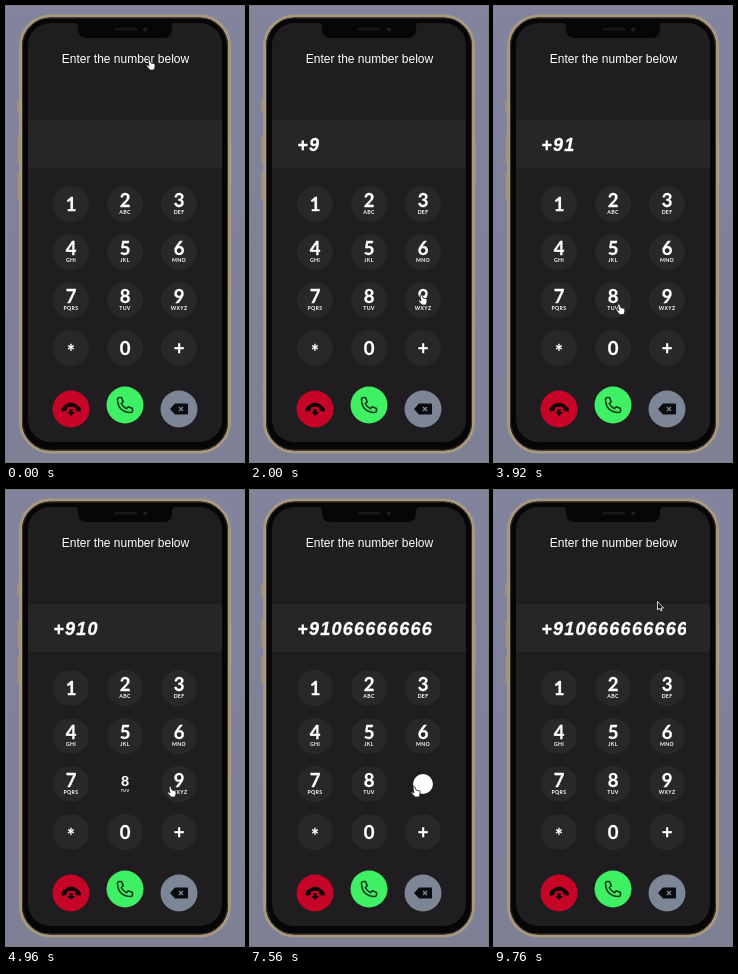
Animation, 238 px wide and 456 px high, one loop 10000 ms. Source, as an HTML page:

```html
<!DOCTYPE html>
<html lang="en">
<head>
<meta charset="utf-8">
<title>Dial pad</title>
<style>
  html, body { margin: 0; width: 100%; height: 100%; overflow: hidden; background: #80819a; }
  svg { display: block; width: 238px; height: 456px; }
  text { fill: #fff; text-anchor: middle; }
  .title { font: 12px "Liberation Sans", Arial, sans-serif; }
  .display { font: italic bold 18px "Liberation Sans", Arial, sans-serif; letter-spacing: 1.25px; text-anchor: start; stroke: #fff; stroke-width: .3; }
  .digit { font: bold 18.5px Lato, sans-serif; stroke: #fff; stroke-width: .3; }
  .letters { font: bold 5.2px Lato, sans-serif; letter-spacing: .3px; }
</style>
</head>
<body>
<svg viewBox="0 0 238 456">
  <defs>
    <clipPath id="band"><rect x="44" y="114" width="148" height="48"/></clipPath>
    <linearGradient id="wall" x2="0" y2="1"><stop stop-color="#82839d"/><stop offset="1" stop-color="#7e8096"/></linearGradient>
  </defs>
  <rect width="238" height="456" fill="url(#wall)"/>

  <g fill="#9c8d78">
    <rect x="11" y="93" width="4" height="14" rx="1"/>
    <rect x="11" y="129" width="4" height="28" rx="1"/>
    <rect x="11" y="166" width="4" height="28" rx="1"/>
    <rect x="223" y="134" width="3" height="45" rx="1"/>
  </g>
  <rect x="14.500" y="10" width="209" height="436" rx="30" fill="#060607" stroke="#a8987f" stroke-width="3"/>
  <rect x="16.500" y="12" width="205" height="432" rx="28" fill="none" stroke="#3a332c"/>
  <rect x="22" y="17" width="194" height="419" rx="22" fill="#1f1d1f"/>
  <rect x="22" y="114" width="194" height="48" fill="#272527"/>
  <path d="M68 16h102q-4 1-4 5v2q0 9-9 9H81q-9 0-9-9v-2q0-4-4-5z" fill="#060607"/>
  <rect x="108" y="22" width="23" height="2.4" rx="1.2" fill="#17171a"/>
  <circle cx="139" cy="23.500" r="2" fill="#1b2030"/>

  <text class="title" x="119.5" y="57.3">Enter the number below</text>
  <g clip-path="url(#band)"><text class="display" id="display" x="47.3" y="145"></text></g>
  <g id="keys"></g>

  <g transform="translate(65 403)">
    <circle r="18.5" fill="#c60428"/>
    <path d="M-10 0Q0-13 10 0Q10 3 8 2.5L5 2Q4 1 4-1.500Q0-3-4-1.500Q-4 1-5 2L-8 2.5Q-10 3-10 0zM-1.500 0h3v3H4L0 7-4 3h2.500z" fill="#140407"/>
  </g>
  <g transform="translate(119 399)">
    <circle r="18.5" fill="#3ff065"/>
    <path d="M-7.5-5.5Q-7.5-7.5-5.5-7.5H-3.5L-1.800-3.2-3.8-1.500Q-2 2 1.5 3.8L3.2 1.8 7.5 3.5V5.5Q7.5 7.5 5.5 7.5Q-7 7-7.5-5.5z"
      fill="none" stroke="#123d1d" stroke-width="1.6" stroke-linejoin="round"/>
  </g>
  <g transform="translate(173 403)">
    <circle r="18.5" fill="#7c8696"/>
    <path d="M-9 0L-4-5.500H8Q9-5.500 9-4.500V4.500Q9 5.500 8 5.500H-4z" fill="#0b0c0e"/>
    <path d="M0-2l4 4m0-4l-4 4" stroke="#7c8696" stroke-width="1.4"/>
  </g>

  <path id="hand" fill="#fff" stroke="#222" stroke-width=".8" stroke-linejoin="round"
    d="M2 1Q3 0 4 1L5 4 9 5V8L8 11H4L.6 7Q.2 6 1.5 6L3 7z"/>
  <path id="arrow" fill="#111" stroke="#fff" stroke-width=".8" stroke-linejoin="round"
    d="M.5.5V9L2.500 7 4 10 5 9.500 4 7H6.500z"/>
</svg>
<script>
const LOOP = 10000;
const NUMBER = "+910666666666";
const TAP_DELAY = 160, TAP_GAP = 330;
// Pointer moves: where to, when, and how often it taps on arrival
const MOVES = [
  { x: 140, y: 53, leave: -1, arrive: 0, taps: 0 },
  { x: 168, y: 339, leave: 280, arrive: 1280, taps: 1 },
  { x: 168, y: 288, leave: 1460, arrive: 1740, taps: 1 },
  { x: 59, y: 195, leave: 2120, arrive: 2680, taps: 1 },
  { x: 122, y: 298, leave: 2860, arrive: 4440, taps: 1 },
  { x: 161, y: 296, leave: 4620, arrive: 4915, taps: 9 },
  { x: 112, y: 406, leave: 7780, arrive: 8480, taps: 0 },
  { x: 163, y: 111, leave: 9320, arrive: 9740, taps: 0 }
];
const $ = id => document.getElementById(id);
const ramp = (t, from, to) => Math.min(1, Math.max(0, (t - from) / (to - from)));
const grow = (t, from, to) => Math.sqrt(ramp(t, from, to));
const easeOut = p => 1 - (1 - p) ** 5;

const keyAt = (x, y) => Math.round((x - 60) / 54) + 3 * Math.round((y - 194) / 48);
const taps = MOVES.flatMap(m => Array.from({ length: m.taps }, (_, i) =>
  ({ time: m.arrive + TAP_DELAY + i * TAP_GAP, key: keyAt(m.x, m.y) })));

const keys = ["1", "2 ABC", "3 DEF", "4 GHI", "5 JKL", "6 MNO", "7 PQRS", "8 TUV", "9 WXYZ", "*", "0", "+"].map((name, i) => {
  const [digit, letters = ""] = name.split(" ");
  const baseline = digit === "*" ? 10 : letters ? 2.5 : 6.5;
  const x = 65 + i % 3 * 54, y = 198 + Math.floor(i / 3) * 48;
  $("keys").insertAdjacentHTML("beforeend", `<g transform="translate(${x} ${y})">
    <circle r="18" fill="#292729"/>
    <g><text class="digit" y="${baseline}">${digit}</text>
    <text class="letters" y="10.3">${letters}</text></g>
    <circle fill="none" stroke="#fff"/></g>`);
  const [disc, label, ring] = $("keys").lastElementChild.children;
  return { disc, label, ring };
});

// A white dot bursts into a ring, then the label grows back
function drawKey({ disc, label, ring }, age) {
  const outer = 16 * grow(age, 110, 280), hole = 16 * grow(age, 180, 280);
  const idle = age < 110;
  ring.setAttribute("r", (outer + hole) / 2);
  ring.setAttribute("stroke-width", outer - hole);
  label.setAttribute("transform", `scale(${idle ? 1 : grow(age, 175, 500)})`);
  disc.setAttribute("opacity", idle ? 1 : ramp(age, 360, 500));
}

function drawPointer(t) {
  const i = MOVES.findLastIndex(m => m.leave <= t);
  const to = MOVES[i], from = MOVES[i - 1] || to;
  const p = easeOut(ramp(t, to.leave, to.arrive));
  const x = from.x + (to.x - from.x) * p, y = from.y + (to.y - from.y) * p;
  const shape = i === MOVES.length - 1 && p > .2 ? "arrow" : "hand";
  for (const id of ["hand", "arrow"]) {
    $(id).setAttribute("transform", `translate(${x} ${y})`);
    $(id).setAttribute("visibility", id === shape ? "visible" : "hidden");
  }
}

function frame() {
  const t = performance.now() % LOOP;
  const done = taps.filter(tap => tap.time <= t);
  $("display").textContent = NUMBER.slice(0, done.length);
  keys.forEach((key, i) => {
    const last = done.findLast(tap => tap.key === i);
    drawKey(key, last ? t - last.time : LOOP);
  });
  drawPointer(t);
  requestAnimationFrame(frame);
}
frame();
</script>
</body>
</html>
```
